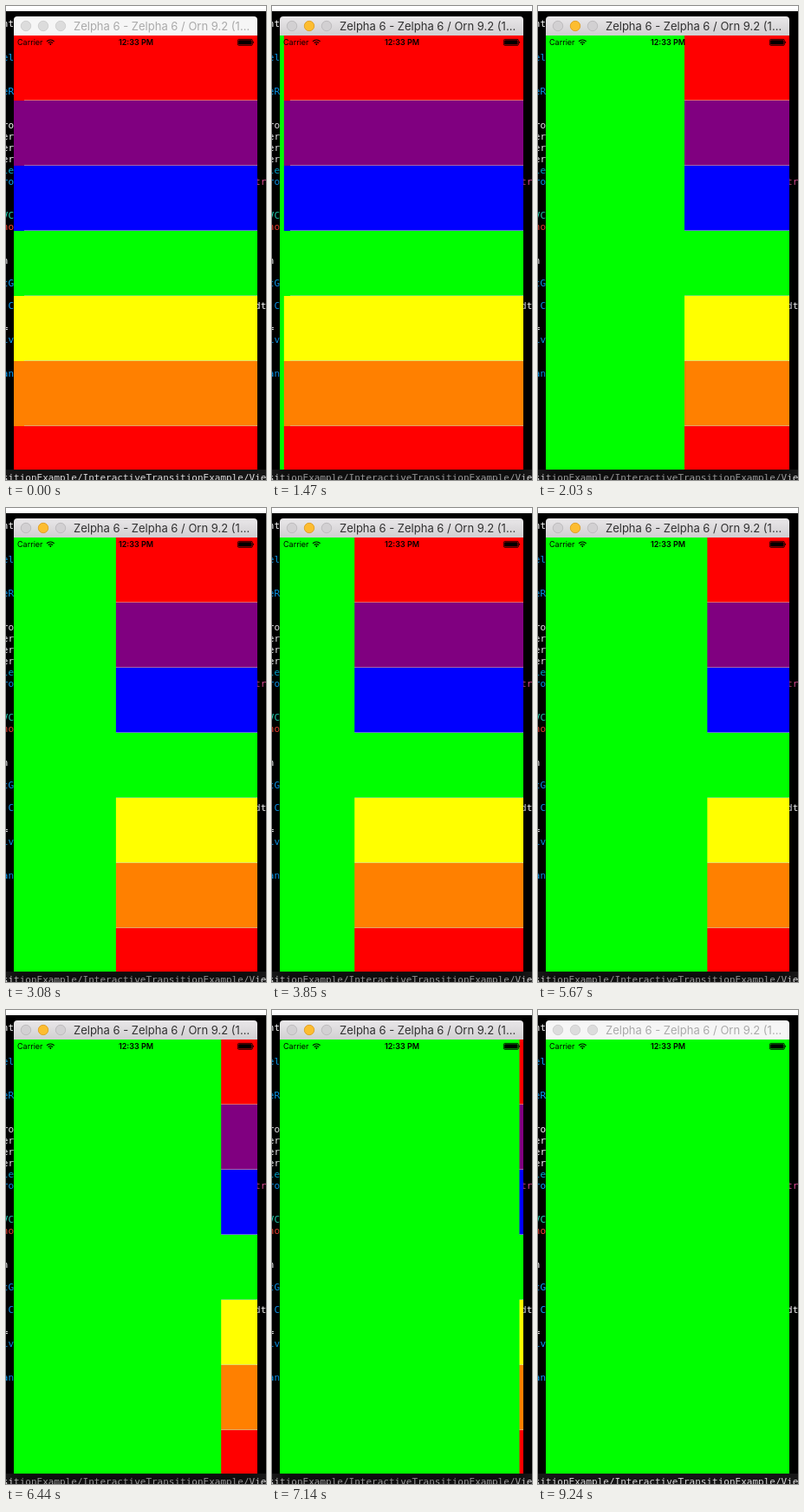
Animation of 300 by 546 pixels, one loop 9310 ms. Source, as an HTML page:

```html
<!DOCTYPE html>
<html lang="en">
<head>
<meta charset="utf-8">
<title>Interactive transition</title>
<style>
  html, body { margin: 0; width: 100%; height: 100%; overflow: hidden; background: #000; }
  svg { display: block; width: 100%; height: 100%; }
  text { white-space: pre; }
  .code { font: 11px "DejaVu Sans Mono", monospace; }
  .title { font: 13px Inter, "Open Sans", sans-serif; fill: #aaa; }
  .status { font: 9px Inter, "Liberation Sans", sans-serif; }
  .clock { font-weight: 600; text-anchor: middle; }
  .shadow { filter: blur(6px); opacity: .1; }
  .bar { fill: #f6f6f6; }
  .btn { fill: #dcdcdc; stroke: #d0d0d0; }
  .active .shadow { opacity: .45; }
  .active .bar { fill: url(#metal); }
  .active .title { fill: #303030; }
  .active .btn { fill: #d2d0d2; stroke: #bebcbe; }
  .active .min { fill: #fdbd30; stroke: #e2a32a; }
</style>
</head>
<body>
<svg id="stage" viewBox="0 0 300 546">
  <defs>
    <linearGradient id="metal" x2="0" y2="1">
      <stop stop-color="#e9e7e9"/>
      <stop offset="1" stop-color="#d1cfd1"/>
    </linearGradient>
  </defs>
  <rect width="300" height="546"/>
  <rect y="534" width="300" height="12" fill="#181818"/>
  <g id="editor" class="code"></g>
  <rect class="shadow" x="9" y="36" width="281" height="512"/>
  <rect width="300" height="6" fill="#fff"/>

  <path class="bar" d="M9 34V16a4 4 0 0 1 4-4H286a4 4 0 0 1 4 4V34z"/>
  <circle class="btn" cx="23" cy="23" r="5.7"/>
  <circle class="btn min" cx="43" cy="23" r="5.7"/>
  <circle class="btn" cx="63" cy="23" r="5.7"/>
  <text class="title" x="78" y="28">Zelpha 6 - Zelpha 6 / Orn 9.2 (1…</text>

  <g id="rows" shape-rendering="crispEdges"></g>
  <rect id="panel" x="9" y="34" width="0" height="500" fill="#0f0"/>

  <g class="status">
    <text x="13" y="45">Carrier</text>
    <text class="clock" x="150" y="45">12:33 PM</text>
  </g>
  <g fill="none" stroke="#000" stroke-width="1.2">
    <path d="M47 40.8a6 6 0 0 1 8.6 0M48.7 42.6a3.7 3.7 0 0 1 5.2 0"/>
    <path d="M51.3 45.2l-1.3-1.4a1.8 1.8 0 0 1 2.6 0z" fill="#000" stroke="none"/>
    <rect x="267.4" y="38.4" width="17" height="7" rx="1.3" stroke-width=".8"/>
    <rect x="268.2" y="39.2" width="15.4" height="5.4" rx=".7" fill="#000" stroke="none"/>
    <path d="M285.2 40.4a1.5 1.5 0 0 1 0 2.8z" fill="#000" stroke="none"/>
  </g>
</svg>
<script>
const LOOP = 9310, TICK = 70, LEFT = 9, TOP = 34, BOTTOM = 534, RIGHT = 290;
const stage = document.getElementById('stage');
const panel = document.getElementById('panel');

function add(parent, tag, attrs, text = '') {
  const el = document.createElementNS('http://www.w3.org/2000/svg', tag);
  for (const key in attrs) el.setAttribute(key, attrs[key]);
  el.textContent = text;
  document.getElementById(parent).append(el);
}

// Editor text: each line starts with its colour key
const colours = { w: '#fff', b: '#0aa4ff', c: '#00b4e0', t: '#22dcb8', r: '#ff4632', p: '#e8509c' };
const CODE_X = -4.2, CHAR = 6.62;

function code(line, col, [key, ...chars]) {
  add('editor', 'text', { x: CODE_X + col * CHAR, y: 24 + line * 13, fill: colours[key] }, chars.join(''));
}
'wnt|||bel|||beR|||wro|wer|wer|wer|cle|bro|||tVC|rno|||wn||btG||b C||w=|biv|||ban'
  .split('|').forEach((text, line) => text && code(line, 0, text));
code(14, 44, 'ptr');
code(25, 44, 'wdt');
add('editor', 'text', { x: CODE_X, y: 547, fill: '#eee' },
  'sitionExample/InteractiveTransitionExample/Vie');

// Table rows with inset separators
['#f00', '#800080', '#00f', '#0f0', '#ff0', '#ff8000', '#f00'].forEach((fill, i) => {
  const y = TOP + i * 75, end = Math.min(y + 75, BOTTOM);
  add('rows', 'rect', { x: LEFT, y, width: RIGHT - LEFT, height: end - y, fill });
  if (end < BOTTOM)
    add('rows', 'rect', { x: 21, y: end - 1, width: RIGHT - 21, height: 1, fill: '#c8c7cc', opacity: .5 });
});

// Finger strokes moving the panel's right edge
const swing = u => (1 - Math.cos(Math.PI * u)) / 2;
const slow = u => 1 - (1 - u) ** 1.6;
const even = u => u;
const strokes = [
  { from: 1400, to: 2030, x: 169, ease: swing },
  { from: 2240, to: 2770, x: 62, ease: swing },
  { from: 2770, to: 3290, x: 162, ease: swing },
  { from: 3290, to: 3710, x: 101.5, ease: swing },
  { from: 3780, to: 4480, x: 61, ease: slow },
  { from: 4620, to: 6580, x: 251, ease: slow },
  { from: 6580, to: 7140, x: 285.5, ease: even },
  { from: 7210, to: 7420, x: RIGHT, ease: slow }
];

function edgeAt(t) {
  let edge = LEFT;
  for (const { from, to, x, ease } of strokes) {
    const u = Math.min(1, Math.max(0, (t - from) / (to - from)));
    edge += (x - edge) * ease(u);
  }
  return edge;
}

const start = performance.now();
function draw(now) {
  const t = Math.floor(Math.max(0, now - start) % LOOP / TICK) * TICK;
  stage.classList.toggle('active', t >= 1260 && t < 9240);
  panel.setAttribute('width', edgeAt(t) - LEFT);
  requestAnimationFrame(draw);
}
draw(start);
</script>
</body>
</html>
```
